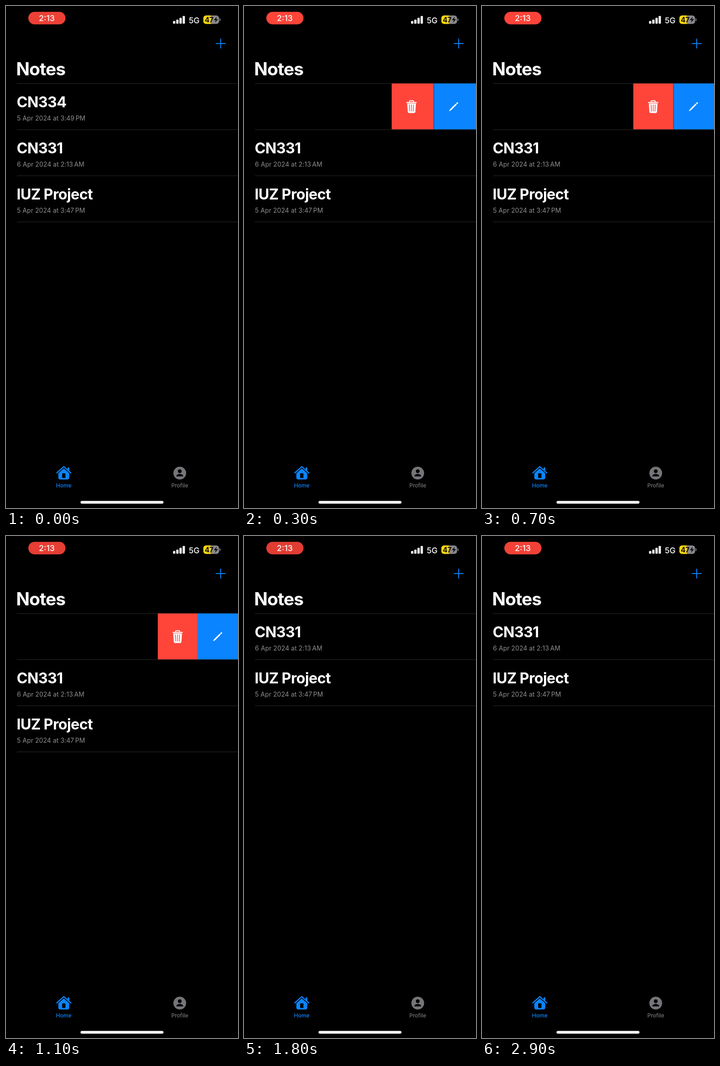
Animation of 509 by 1100 pixels, one loop 3 s. Source, as an HTML page with a canvas:

```html
<!DOCTYPE html>
<html lang="en">
<head>
<meta charset="utf-8">
<title>Notes</title>
<style>
html, body { margin: 0; width: 100%; height: 100%; overflow: hidden; background: #000; }
canvas { display: block; }
</style>
</head>
<body>
<canvas id="stage" width="509" height="1100"></canvas>
<script>
const ctx = document.getElementById('stage').getContext('2d');
const W = 509, H = 1100, LOOP = 3000, STEP = 100;
const BLUE = '#0a84ff', RED = '#ff453a', GRAY = '#757579', WHITE = '#fff';
const LEFT = 24, TOP = 169.5, ROW = 101;
const DELETED_AT = 1800, OVERSHOOT = 185, REST = 176;

const notes = [
  ['CN334', '5 Apr 2024 at 3:49\u2009PM'],
  ['CN331', '6 Apr 2024 at 2:13\u2009AM'],
  ['lUZ Project', '5 Apr 2024 at 3:47\u2009PM']
];

function text(str, x, y, size, weight, color, align = 'left', spacing = 0) {
  ctx.font = `${weight} ${size}px Inter, "Open Sans", sans-serif`;
  ctx.letterSpacing = spacing + 'px';
  ctx.textAlign = align;
  ctx.fillStyle = color;
  ctx.fillText(str, x, y);
}

function rect(x, y, w, h, color, r = 0) {
  ctx.fillStyle = color;
  ctx.beginPath();
  ctx.roundRect(x, y, w, h, r);
  ctx.fill();
}

function disc(x, y, r, color) {
  ctx.fillStyle = color;
  ctx.beginPath();
  ctx.arc(x, y, r, 0, Math.PI * 2);
  ctx.fill();
}

function trace(points) {
  ctx.beginPath();
  points.forEach(([x, y]) => ctx.lineTo(x, y));
}

function poly(points, color) {
  trace(points);
  ctx.fillStyle = color;
  ctx.fill();
}

function line(points, width, color, cap = 'round') {
  trace(points);
  ctx.lineWidth = width;
  ctx.lineCap = cap;
  ctx.lineJoin = 'round';
  ctx.strokeStyle = color;
  ctx.stroke();
}

// Breathing brightness of the recording pill
function pulse(t) {
  return Math.min(1, 0.93 - 0.08 * Math.cos((t - 1480) / 1000 * Math.PI));
}

// Distance the first row has been pulled to the left
function swipe(t) {
  if (t < 300) {
    const p = t / 300;
    return OVERSHOOT * p * p * (3 - 2 * p);
  }
  return REST + (OVERSHOOT - REST) * Math.exp((300 - t) / 182);
}

function statusBar(t) {
  const k = pulse(t);
  rect(49, 12.7, 81.5, 27.5, `rgb(${255 * k}, ${69 * k}, ${58 * k})`, 13.7);
  text('2:13', 89.5, 33, 17.8, 500, WHITE, 'center');

  [6, 9, 13, 17].forEach((h, i) => rect(366.5 + i * 7, 38.8 - h, 5, h, WHITE, 1.5));
  text('5G', 401, 37.5, 17.6, 500, WHITE);

  ctx.save();
  ctx.beginPath();
  ctx.roundRect(433, 20.8, 34.5, 18.5, 6);
  ctx.clip();
  rect(433, 20, 35, 20, '#89898d');
  rect(433, 20, 16.5, 20, '#ffd60a');
  ctx.restore();
  rect(468.6, 27, 2, 6, '#89898d', [0, 2, 2, 0]);
  text('47', 436, 35.8, 15.5, 700, '#111', 'left', -0.3);
  poly([[462.5, 23.3], [455.8, 31.1], [460, 31.1], [458.6, 36.8],
        [465.3, 28.7], [461.1, 28.7]], '#111');
}

function header() {
  line([[460.9, 82.2], [481.1, 82.2]], 1.9, BLUE);
  line([[471, 72.1], [471, 92.3]], 1.9, BLUE);
  text('Notes', LEFT - 1.8, 151.5, 39, 700, WHITE, 'left', -0.95);
}

function note([title, date], x, y) {
  text(title, x - 0.5, y + 52.5, 32.3, 700, WHITE, 'left', -0.6);
  text(date, x, y + 81.5, 14, 400, '#8e8e93', 'left', 0.05);
}

function trash(x, y) {
  ctx.save();
  ctx.translate(x, y);
  line([[-4.5, -10], [-4.5, -12], [-3.5, -13], [3.5, -13], [4.5, -12], [4.5, -10]], 1.8, WHITE);
  rect(-11.3, -10.3, 22.6, 2.4, WHITE, 1.2);
  ctx.beginPath();
  ctx.moveTo(-9.6, -7);
  ctx.lineTo(9.6, -7);
  ctx.lineTo(8.4, 11);
  ctx.quadraticCurveTo(8.2, 14, 5.3, 14);
  ctx.lineTo(-5.3, 14);
  ctx.quadraticCurveTo(-8.2, 14, -8.4, 11);
  ctx.fillStyle = WHITE;
  ctx.fill();
  for (const s of [-1, 0, 1]) line([[s * 4.4, -4], [s * 3.9, 10]], 1.5, RED);
  ctx.restore();
}

function pencil(x, y) {
  ctx.save();
  ctx.translate(x, y);
  ctx.rotate(-Math.PI / 4);
  rect(-9.5, -1.6, 17.5, 3.2, WHITE);
  poly([[-9.5, -1.6], [-13.8, -0.4], [-13.8, 0.4], [-9.5, 1.6]], WHITE);
  rect(9, -1.6, 4, 3.2, WHITE, [0, 1.4, 1.4, 0]);
  ctx.restore();
}

function action(x, w, color, icon) {
  ctx.save();
  ctx.beginPath();
  ctx.rect(x, TOP, w, ROW);
  ctx.clip();
  rect(x, TOP, w, ROW, color);
  icon(x + 43.6, TOP + 51);
  ctx.restore();
}

function list(t) {
  const rows = t < DELETED_AT ? notes : notes.slice(1);
  const pull = t < DELETED_AT ? swipe(t) : 0;
  for (let i = 0; i <= rows.length; i++) {
    rect(LEFT, TOP + i * ROW, W - LEFT, 1, '#2c2c2f');
  }
  rows.forEach((row, i) => note(row, LEFT - (i ? 0 : pull), TOP + i * ROW));
  if (pull > 0) {
    action(W - pull, pull / 2, RED, trash);
    action(W - pull / 2, pull / 2, BLUE, pencil);
  }
}

function tabBar() {
  poly([[126.8, 1013], [138.8, 1023.8], [138.8, 1035], [136.3, 1037.6],
        [117.3, 1037.6], [114.8, 1035], [114.8, 1023.8]], BLUE);
  const roof = [[111.6, 1023], [126.8, 1009.4], [142, 1023]];
  line(roof, 5.4, '#000');
  rect(135.2, 1011, 3.7, 7, BLUE, 1);
  line(roof, 2.6, BLUE);
  rect(123.2, 1024, 7.2, 10.3, '#000', 0.8);
  text('Home', 126.8, 1055, 12, 500, BLUE, 'center');

  disc(381.2, 1023.6, 14, GRAY);
  disc(381.2, 1019.4, 4.2, '#000');
  ctx.beginPath();
  ctx.moveTo(373.6, 1030.8);
  ctx.bezierCurveTo(373.6, 1023.6, 388.8, 1023.6, 388.8, 1030.8);
  ctx.closePath();
  ctx.fill();
  text('Profile', 381.2, 1055, 12, 500, GRAY, 'center');

  rect(163.5, 1084.6, 182, 5.9, WHITE, 3);
}

function draw(now) {
  const t = Math.floor((now % LOOP + 0.01) / STEP) * STEP;
  rect(0, 0, W, H, '#000');
  statusBar(t);
  header();
  list(t);
  tabBar();
}

let start;
function tick(now) {
  start ??= now;
  draw(Math.max(0, now - start));
  requestAnimationFrame(tick);
}
draw(0);
requestAnimationFrame(tick);
</script>
</body>
</html>
```
